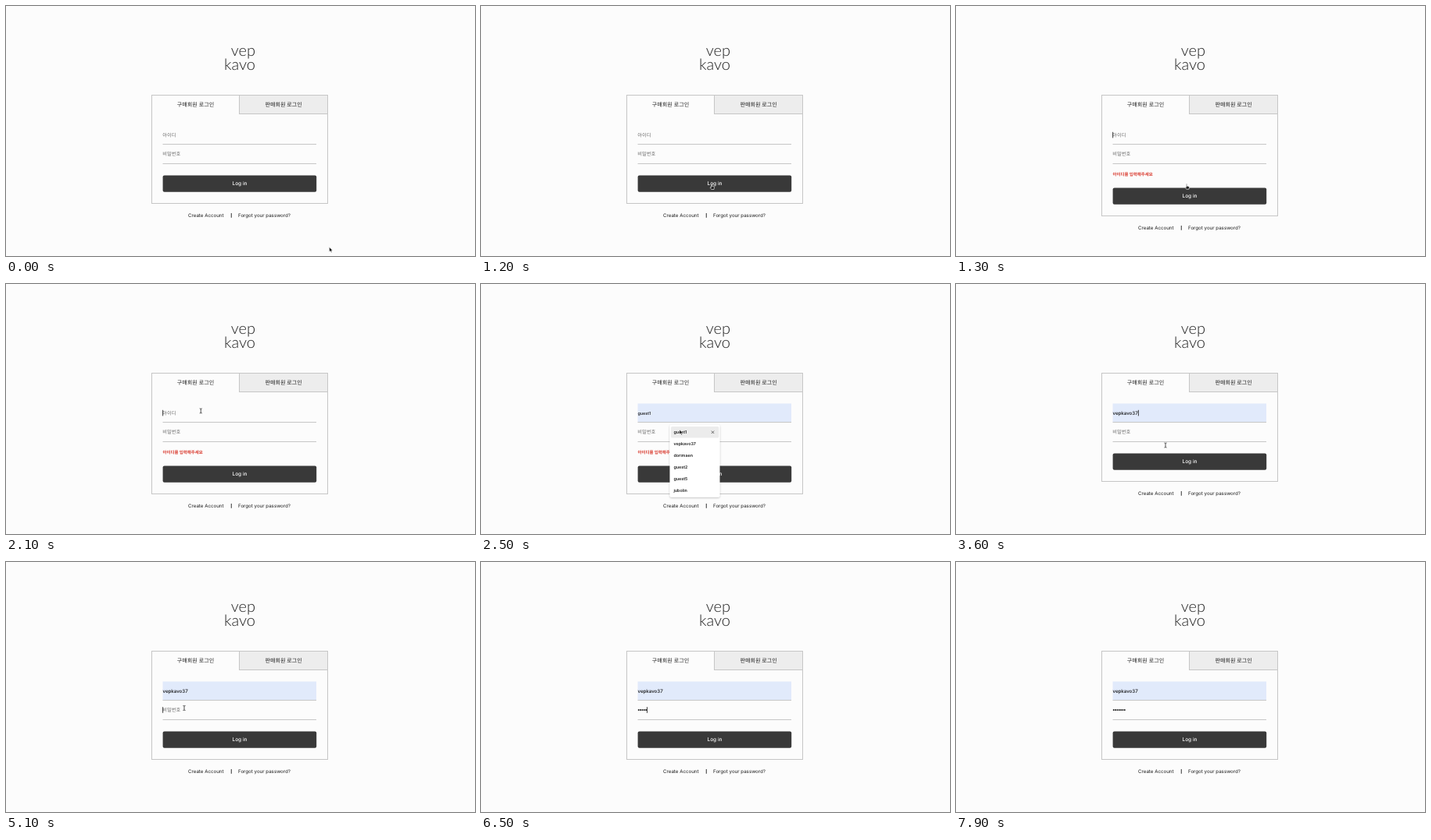
An HTML page for the animation above (8000 ms loop, 600 by 321 pixels).

```html
<!DOCTYPE html>
<html lang="ko">
<head>
<meta charset="utf-8">
<title>Login</title>
<style>
html, body { margin: 0; width: 100%; height: 100%; overflow: hidden; background: #fcfcfc; }
svg { display: block; width: 100vw; height: 100vh; }
text { font-family: Inter, "Noto Sans CJK KR", "Noto Sans CJK", sans-serif; fill: #1c1c1c; text-rendering: geometricPrecision; white-space: pre; }
.mid { text-anchor: middle; }
.logo { font: 300 20px Lato, sans-serif; text-anchor: end; fill: #222; }
.tab { font-size: 7.05px; font-weight: 500; }
.hint { font-size: 6.25px; fill: #6c6c6c; }
.value { font-weight: 500; fill: #111; }
.link { font-size: 6.18px; }
.item { font-size: 5.4px; font-weight: 600; fill: #222; }
.line { stroke: #c6c6c6; fill: none; }
</style>
</head>
<body>
<svg viewBox="0 0 600 321">
  <defs>
    <filter id="soft" x="-20%" y="-20%" width="140%" height="140%">
      <feDropShadow dx="0" dy="0.8" stdDeviation="1.1" flood-color="#000" flood-opacity="0.28"/>
    </filter>
  </defs>
  <rect width="600" height="321" fill="#fcfcfc"/>
  <text class="logo" x="319" y="64">vep</text>
  <text class="logo" x="319" y="82">kavo</text>

  <rect id="box" class="line" x="186.5" y="114.5" width="225" height="139"/>
  <rect class="line" x="298.5" y="114.5" width="113" height="24" style="fill:#ededed"/>
  <text class="tab mid" x="242.5" y="129.2">구매회원 로그인</text>
  <text class="tab mid" x="355.2" y="129.2">판매회원 로그인</text>

  <rect id="fill" x="200.5" y="153.5" width="196.5" height="24" fill="#e1eafb"/>
  <path class="line" d="M200.5 177.5H397M200.5 202.5H397"/>
  <text id="idHint" class="hint" x="200.3" y="167.5">아이디</text>
  <text id="idText" class="value" x="200.5" y="167.8"></text>
  <text id="pwHint" class="hint" x="200.3" y="192.1">비밀번호</text>
  <g id="dots" fill="#111"></g>
  <text id="error" x="200.4" y="217.6" style="font-size:5.45px;font-weight:700;fill:#d9382c">아이디를 입력해주세요</text>

  <g id="lower">
    <rect x="200.6" y="217.4" width="196.6" height="21.4" rx="2" fill="#393939"/>
    <text class="mid" x="299" y="230.3" style="font-size:6.56px;font-weight:500;fill:#fff">Log in</text>
    <text class="link" x="233" y="271.2">Create Account</text>
    <rect x="287.8" y="266" width="0.9" height="5.8" fill="#222"/>
    <text class="link" x="297" y="271.2">Forgot your password?</text>
  </g>
  <rect id="caret" width="0.8" height="7.6" fill="#111"/>

  <g id="menu">
    <rect x="241.5" y="180.5" width="64" height="93.3" rx="2.5" fill="#fff" filter="url(#soft)"/>
    <g id="hover">
      <rect x="243" y="-7.3" width="61.3" height="14.6" rx="1.5" fill="#ececec"/>
      <path d="M294.8 -1.7l3.4 3.4m0 -3.4l-3.4 3.4" stroke="#333" stroke-width="0.7"/>
    </g>
  </g>

  <g id="arrow">
    <path d="M0 0V6L1.4 4.8L2.4 7L3.4 6.5L2.4 4.4H4.2Z" fill="#111" stroke="#fff" stroke-width="0.5"/>
  </g>
  <g id="hand">
    <path d="M-.5 .6Q0 -.2 .6 .6V3L2.9 3.4Q3.6 3.6 3.5 4.4L3 7H-.2L-2 4.6Q-1.7 3.7 -.5 4.6Z" fill="#222" stroke="#fff" stroke-width="0.6"/>
  </g>
  <g id="beam">
    <path d="M-1.5 -3Q0 -3 0 -2.3V2.3Q0 3 -1.5 3M1.5 -3Q0 -3 0 -2.3M0 2.3Q0 3 1.5 3" fill="none" stroke="#222" stroke-width="0.8"/>
  </g>
</svg>
<script>
const LOOP = 8000, STEP = 100, SHIFT = 16, DOT = 2.35;
const NS = "http://www.w3.org/2000/svg";
const users = ["guest1", "vepkavo37", "dorimaen", "guest2", "guest5", "jubolin"];
const $ = id => document.getElementById(id);
const show = (id, on) => $(id).setAttribute("visibility", on ? "visible" : "hidden");
const move = (id, x, y) => $(id).setAttribute("transform", `translate(${x} ${y})`);
const rowY = i => 190.5 + i * 14.82;

function add(parent, tag, attrs, text = "") {
  const el = document.createElementNS(NS, tag);
  for (const k in attrs) el.setAttribute(k, attrs[k]);
  el.textContent = text;
  $(parent).append(el);
  return el;
}

users.forEach((name, i) => add("menu", "text", { class: "item", x: 246.4, y: rowY(i) + 1.9 }, name));
const dots = Array.from({ length: 7 }, (_, i) =>
  add("dots", "circle", { cx: 201.7 + i * DOT, cy: 190, r: 0.95 }));

// pointer: time, x, y
const path = [
  [0, 413.6, 309.6], [150, 440, 303], [350, 472, 285], [550, 420, 260],
  [800, 283, 231], [900, 291, 231], [1100, 292, 230], [1200, 295, 228.5],
  [1400, 295, 228], [1700, 272, 192], [2000, 249, 162.5], [2300, 250, 164],
  [2500, 254, 187], [2700, 258, 204], [2900, 262, 223], [3100, 264.8, 220],
  [3300, 266, 206], [3600, 268, 207], [3900, 236, 191], [4100, 229, 186.5],
  [4600, 228, 187.5], [LOOP, 228, 187.5]
];
const typed = [[7400, 7], [6500, 5], [6200, 4], [5900, 3], [5700, 2], [5600, 1], [0, 0]];

function pointer(t) {
  const i = Math.max(1, path.findIndex(p => p[0] >= t));
  const [t0, x0, y0] = path[i - 1], [t1, x1, y1] = path[i];
  const u = (t - t0) / (t1 - t0), k = u * u * (3 - 2 * u);
  return [x0 + (x1 - x0) * k, y0 + (y1 - y0) * k];
}

const cursorKind = t =>
  t < 800 ? "arrow" : t < 1400 ? "hand" : t < 1800 ? "arrow" :
  t < 2400 ? "beam" : t < 3400 ? "arrow" : t < 5600 ? "beam" : "";

// start of the current caret blink, reset by every click and key
function caretStart(t, count) {
  if (count) return typed.find(p => t >= p[0])[0];
  return [4100, 3400, 2000, 1300].find(s => t >= s);
}

function draw(t) {
  const [x, y] = pointer(t), kind = cursorKind(t);
  for (const id of ["arrow", "hand", "beam"]) {
    show(id, id === kind);
    move(id, x, y);
  }

  const failed = t >= 1300 && t < 3400;
  $("box").setAttribute("height", failed ? 139 + SHIFT : 139);
  move("lower", 0, failed ? SHIFT : 0);
  show("error", failed);

  const open = t >= 2200 && t < 3400;
  const row = open && t >= 2500 ? Math.max(0, Math.min(2, Math.round((y + 1 - rowY(0)) / 14.82))) : -1;
  show("menu", open);
  show("hover", row >= 0);
  move("hover", 0, rowY(Math.max(row, 0)) - 0.2);

  const chosen = t >= 3400, name = chosen ? users[1] : row >= 0 ? users[row] : "";
  show("fill", name);
  show("idHint", !name);
  $("idText").textContent = name;
  $("idText").style.fontSize = chosen ? "6.17px" : "5.4px";

  const count = typed.find(p => t >= p[0])[1];
  show("pwHint", !count);
  dots.forEach((d, i) => d.setAttribute("visibility", i < count ? "visible" : "hidden"));

  const start = caretStart(t, count);
  show("caret", start !== undefined && Math.floor((t - start) / 500) % 2 === 0);
  const inPw = t >= 4100;
  const cx = inPw ? 200.3 + count * DOT : chosen ? 200.7 + $("idText").getComputedTextLength() : 200.3;
  move("caret", cx, inPw ? 186.2 : 161.8);
}

function frame(now) {
  draw(Math.floor((now % LOOP) / STEP) * STEP);
  requestAnimationFrame(frame);
}
draw(0);
requestAnimationFrame(frame);
</script>
</body>
</html>
```
